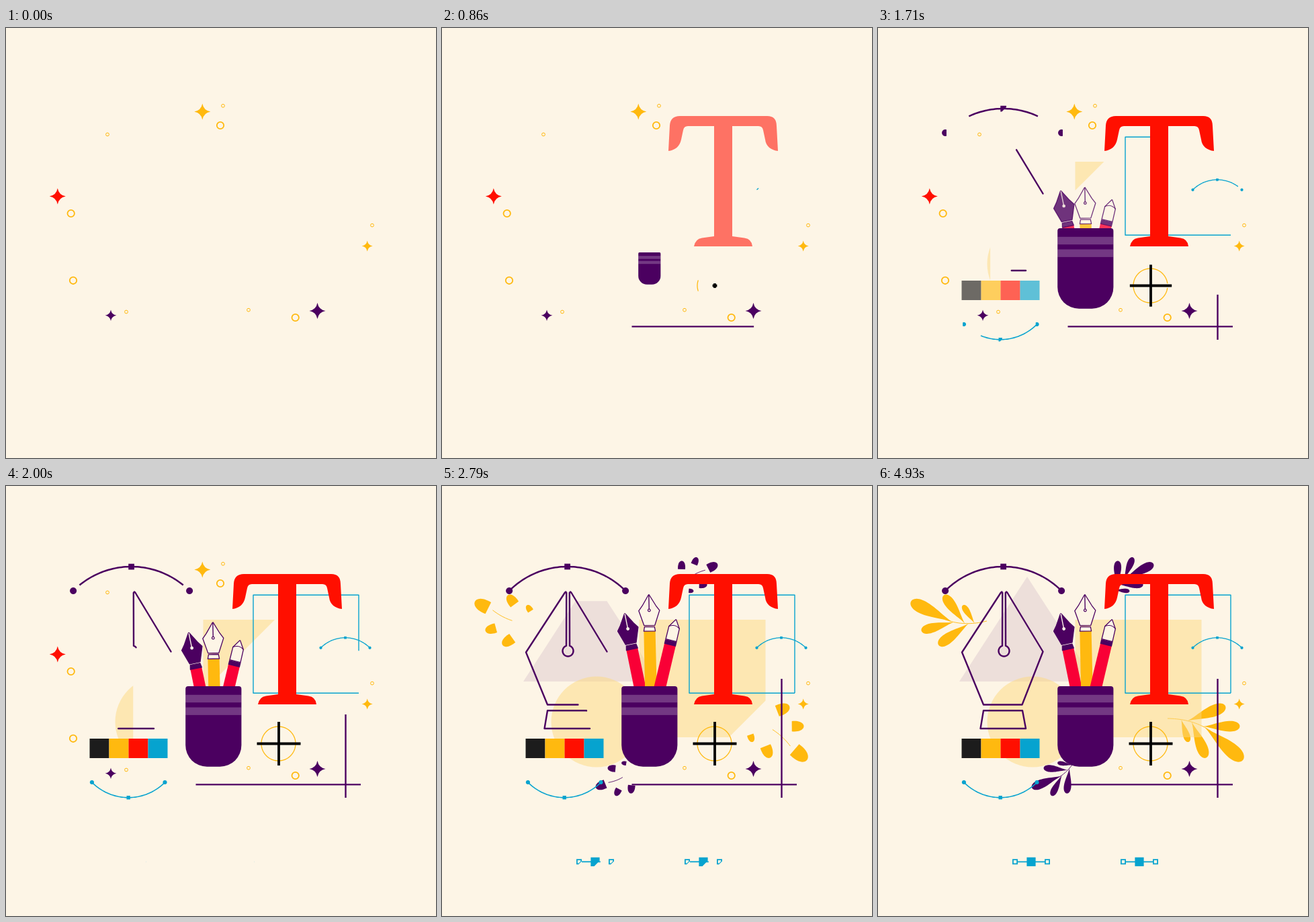
An HTML page with a canvas for the animation above (5.07 s loop, 640 by 640 pixels).

```html
<!DOCTYPE html>
<html lang="en">
<head>
<meta charset="utf-8">
<title>Design tools</title>
<style>
html, body { margin: 0; width: 100%; height: 100%; overflow: hidden; background: #fdf5e6; }
canvas { display: block; width: 640px; height: 640px; }
</style>
</head>
<body>
<canvas id="stage" width="640" height="640"></canvas>
<script>
const ctx = document.getElementById('stage').getContext('2d');
const BG = '#fdf5e6', PURPLE = '#4b0060', YELLOW = '#ffb90f', PALE = '#fed980', RED = '#ff0f00',
      CYAN = '#06a3cf', PINK = '#f90036', BLACK = '#1c1c1c';
const LOOP = 5070, STEP = 500 / 7;
let now = 0;

// Eased progress between two times
function ease(start, end) {
  const u = Math.min(1, Math.max(0, (now - start) / (end - start)));
  return u * u * (3 - 2 * u);
}

const dist = (a, b) => Math.hypot(b[0] - a[0], b[1] - a[1]);
const mix = (a, b, s) => [a[0] + (b[0] - a[0]) * s, a[1] + (b[1] - a[1]) * s];
const lengthOf = pts => pts.reduce((sum, p, i) => i ? sum + dist(pts[i - 1], p) : 0, 0);
const sample = (n, fn) => Array.from({ length: n + 1 }, (_, i) => fn(i / n));

function slice(pts, from, to) {
  const out = [];
  let pos = 0;
  for (let i = 1; i < pts.length; i++) {
    const a = pts[i - 1], b = pts[i], d = dist(a, b);
    if (d && pos + d >= from && pos <= to) {
      if (!out.length) out.push(mix(a, b, Math.max(0, (from - pos) / d)));
      out.push(mix(a, b, Math.min(1, (to - pos) / d)));
    }
    pos += d;
  }
  return out;
}

function trace(pts) {
  pts.forEach((p, i) => i ? ctx.lineTo(...p) : ctx.moveTo(...p));
}

// Part of an open line, grown from its start or from its middle
function line(pts, t, color, width, fromMiddle) {
  if (t <= 0) return;
  const len = lengthOf(pts), a = fromMiddle ? len * (1 - t) / 2 : 0;
  ctx.beginPath();
  trace(slice(pts, a, a + len * t));
  ctx.strokeStyle = color;
  ctx.lineWidth = width;
  ctx.stroke();
}

// Part of a closed outline, grown both ways from its first point
function grown(pts, t) {
  if (t >= 1) return pts;
  const twice = [...pts, ...pts, pts[0]], len = lengthOf([...pts, pts[0]]);
  return slice(twice, len * (1 - t / 2), len * (1 + t / 2));
}

function shape(t, color, ...outlines) {
  if (t <= 0) return;
  ctx.beginPath();
  for (const pts of outlines) {
    trace(grown(pts, t));
    ctx.closePath();
  }
  ctx.fillStyle = color;
  ctx.fill('evenodd');
}

function faded(alpha, draw) {
  ctx.save();
  ctx.globalAlpha = alpha;
  draw();
  ctx.restore();
}

const curve = (a, c, b) => sample(32, s => mix(mix(a, c, s), mix(c, b, s), s));

const circle = (x, y, r, start = Math.PI, sweep = 2 * Math.PI) => sample(64, s => {
  const a = start + sweep * s;
  return [x + r * Math.cos(a), y + r * Math.sin(a)];
});

const box = (x, y, w, h = w) => [[x, y], [x + w, y], [x + w, y + h], [x, y + h]];
const square = (x, y, size) => box(x - size / 2, y - size / 2, size);

// Outline that mirrors [half width, y] pairs about x = 0
const mirrored = half => [...half, ...half.map(([x, y]) => [-x, y]).reverse()];

// Round at the tip, pointed at the base
function leaf(color, t, tip, base) {
  const dx = base[0] - tip[0], dy = base[1] - tip[1];
  shape(t, color, sample(48, q => {
    const s = (1 - Math.abs(1 - 2 * q)) ** 2;
    const w = Math.sign(0.5 - q) * 0.145 * Math.sqrt(s) * (1 - s) ** 1.4 / 0.337;
    return [tip[0] + s * dx - w * dy, tip[1] + s * dy + w * dx];
  }));
}

// Leaf tips beside a stem from [0,0]; the last number is the joint along the stem
const LEAVES = [[1, 0, 0.56], [0.613, 0.183, 0.33], [0.778, -0.328, 0.54],
                [0.52, -0.45, 0.29], [0.346, 0.12, 0.2]];

function branch(color, bx, by, tx, ty) {
  const t = ease(2150, 3712), ux = tx - bx, uy = ty - by;
  const place = (x, y) => [bx + x * ux - y * uy, by + x * uy + y * ux];
  const stem = curve(place(0.753, -0.05), place(0.39, -0.209), place(0, 0));
  line(stem, t, color, 0.9);
  for (const [x, y, joint] of LEAVES) {
    leaf(color, t, place(x, y), stem[Math.round(32 * (1 - joint))]);
  }
}

function star(x, y, r, color) {
  ctx.beginPath();
  ctx.moveTo(x, y - r);
  for (let a = 0; a < 4; a++) {
    const mid = (a - 0.5) * Math.PI / 2, end = a * Math.PI / 2, k = r * 0.22;
    ctx.quadraticCurveTo(x + k * Math.cos(mid), y + k * Math.sin(mid),
      x + r * Math.cos(end), y + r * Math.sin(end));
  }
  ctx.fillStyle = color;
  ctx.fill();
}

function ring(x, y, big) {
  ctx.beginPath();
  ctx.arc(x, y, big ? 5.2 : 2.4, 0, 7);
  ctx.strokeStyle = YELLOW;
  ctx.lineWidth = big ? 1.8 : 1;
  ctx.stroke();
}

function sparkles(frame) {
  const off = (...starts) => starts.some(s => frame === s || frame === s + 1);
  if (!off(38, 69)) {
    star(292.3, 124.5, 12, YELLOW);
    star(76.8, 250.5, 12, RED);
    star(156, 427.8, 8.3, PURPLE);
    ring(319, 145, true);
    ring(96.7, 276, true);
    ring(100, 375.8, true);
    ring(323, 115.8);
    ring(151, 158.4);
    ring(179, 422.5);
  }
  if (!off(34, 49)) {
    star(463.5, 421, 12, PURPLE);
    star(537.7, 324.5, 8, YELLOW);
    ring(430.7, 431, true);
    ring(361, 419.7);
    ring(545, 293.6);
  }
}

function backdrop() {
  const t = ease(1290, 3270);
  faded(0.09, () => shape(t, PURPLE, [[222, 291], [121, 291], [222, 135], [323, 291]]));
  faded(0.5, () => {
    shape(t, PALE, circle(230, 351, 67.5));
    shape(t, PALE, box(293.5, 199, 188, 175));
  });
}

function letter() {
  ctx.fillStyle = RED;
  ctx.fill(new Path2D('M337 183L339 145Q340 131 354 131H484Q498 131 498 146L500 183' +
    'C490 182 482 176 481 166L478 152Q477 146 471 146H432V310L450 312.5Q461 314 462 325' +
    'H375Q377 314 387 312.5L405 310V146H366Q360 146 359 152L356 166C354 176 347 182 337 183Z'));
}

// Circular arc centred on x, with a dot at each end and a square at its top; dir -1 hangs it
function handleArc(x, y, half, rise, dir, t, dotT, color, width, dotR, fromMiddle) {
  const r = (half * half + rise * rise) / (2 * rise), spread = Math.asin(half / r);
  const pts = circle(x, y + dir * (r - rise), r, -dir * Math.PI / 2 - spread, 2 * spread);
  if (dir < 0) pts.forEach(p => p[0] = 2 * x - p[0]);
  line(dir < 0 ? [...pts].sort((a, b) => b[0] - a[0]) : pts, t, color, width, fromMiddle);
  for (const side of [-half, half]) {
    shape(dotT, color, circle(x + side, y, dotR, dir > 0 ? Math.PI : 0));
  }
  shape(dotT, color, square(x, y - dir * rise, dotR * 1.75));
}

function bigNib() {
  const t = ease(1290, 3270);
  const eye = circle(187.5, 245.5, 8, -1.25, 2 * Math.PI - 0.64);
  line([[245.5, 246.5], [192.3, 158.5], [191, 157.6], [189.8, 159], ...eye, [185.2, 159],
    [184.3, 157.6], [183, 158.5], [125, 247.5], [157, 325.5], [214.5, 325.5], [245.5, 246.5]],
    t, PURPLE, 2.4);
  line([[220, 361], [152.5, 361], [157, 334.3], [215, 334.3], [220, 361]], t, PURPLE, 2.4);
}

function palette() {
  [BLACK, YELLOW, RED, CYAN].forEach((c, i) => shape(1, c, box(124.5 + 29 * i, 376, 29)));
}

function outlined(pts, fill) {
  shape(1, fill, pts);
  line([...pts, pts[0]], 1, PURPLE, 1.3);
}

function nib(fill, ink) {
  outlined(mirrored([[0.5, 0], [10, 16], [15.5, 23.5], [8, 45.5]]), fill);
  line([[0, 1], [0, 21]], 1, ink, 1.4);
  shape(1, ink, circle(0, 23, 2.4));
  shape(1, fill === BG ? BG : ink, circle(0, 23, 1.2));
  outlined(mirrored([[7.4, 47.5], [8.6, 54]]), fill);
}

function pencilTip() {
  outlined(mirrored([[0.4, 0], [8, 12], [8.2, 31.5]]), BG);
  line(curve([-8, 12], [0, 6], [8, 12]), 1, PURPLE, 1);
  shape(1, PURPLE, mirrored([[8.9, 32], [8.9, 39]]));
}

// A pen with its tip at x, y that rises out of the cup
function pen(x, y, tilt, height, color, head) {
  ctx.save();
  ctx.translate(x, y + height * (1 - ease(1290, 2542)));
  ctx.rotate(tilt);
  shape(1, color, mirrored([[8.6, 38], [8.8, 142]].map(([w, d]) => [w, Math.max(d, head === nib ? 53.5 : 38)])));
  head(color === PINK ? PURPLE : BG, color === PINK ? BG : PURPLE);
  ctx.restore();
}

function pens() {
  pen(272, 190, -0.203, 71.5, PINK, nib);
  pen(307.8, 162, -0.022, 103, YELLOW, nib);
  pen(348.3, 199, 0.234, 77.5, PINK, pencilTip);
}

function cup() {
  const s = ease(321, 1562);
  ctx.save();
  ctx.translate(308.8, 358);
  ctx.scale(s, s);
  ctx.fillStyle = PURPLE;
  ctx.beginPath();
  ctx.roundRect(-41.6, -60, 83.2, 119.8, [4, 4, 32, 32]);
  ctx.fill();
  ctx.fillStyle = 'rgba(255,255,255,.22)';
  for (const y of [-47.2, -28.5]) ctx.fillRect(-41.6, y, 83.2, 11.4);
  ctx.restore();
}

function crosshair() {
  const t = ease(605, 1868);
  line(circle(405.5, 383.5, 25.5, 0), t, YELLOW, 1.3, true);
  line([[373.5, 383.5], [438.5, 383.5]], t, '#000', 3.8, true);
  line([[406, 351], [406, 416]], t, '#000', 3.8, true);
}

function anchor(x) {
  const y = 559.3, t = ease(1962, 3262);
  line([[x - 20, y], [x + 20, y]], t, CYAN, 1.8);
  for (const dx of [-24, 24]) shape(t, CYAN, square(x + dx, y, 8), square(x + dx, y, 4.4));
  shape(t, CYAN, square(x, y, 13.2));
}

function draw(frame) {
  now = frame * STEP;
  ctx.lineJoin = 'round';
  ctx.lineCap = 'butt';
  ctx.fillStyle = BG;
  ctx.fillRect(0, 0, 640, 640);

  branch(YELLOW, 162, 201, 49, 172);
  branch(YELLOW, 431, 346, 543, 408);
  backdrop();
  branch(PURPLE, 346.4, 166.2, 410, 116);
  branch(PURPLE, 295.5, 404.5, 229, 449);
  sparkles(frame);
  line([[525, 308.2], [368, 308.2], [368, 162.2], [525, 162.2], [525, 308.2]],
    ease(1019, 2245), CYAN, 1.4);
  faded(ease(0, 1575), letter);
  line([[282.5, 444.4], [528, 444.4]], ease(0, 1287), PURPLE, 2.4);
  line([[505.5, 464], [505.5, 287]], ease(1166, 2475), PURPLE, 2.4);
  handleArc(186.6, 156, 86.5, 36, 1, ease(1077, 2271), ease(1220, 2070), PURPLE, 2.5, 5, true);
  handleArc(505, 240.8, 36.5, 15, 1, ease(700, 1950), ease(800, 1931), CYAN, 1.3, 2.1);
  handleArc(182.2, 441, 54.3, 22.7, -1, ease(975, 2075), ease(1110, 2060), CYAN, 1.6, 3.1);
  ctx.lineCap = 'round';
  bigNib();
  faded(ease(1360, 1960), palette);
  faded(ease(1290, 1890), pens);
  ctx.lineCap = 'butt';
  cup();
  crosshair();
  anchor(228);
  anchor(389);
}

const began = performance.now();
function tick() {
  const time = (performance.now() - began) % LOOP;
  draw(Math.floor((time + 4) / STEP));
  requestAnimationFrame(tick);
}
tick();
</script>
</body>
</html>
```
